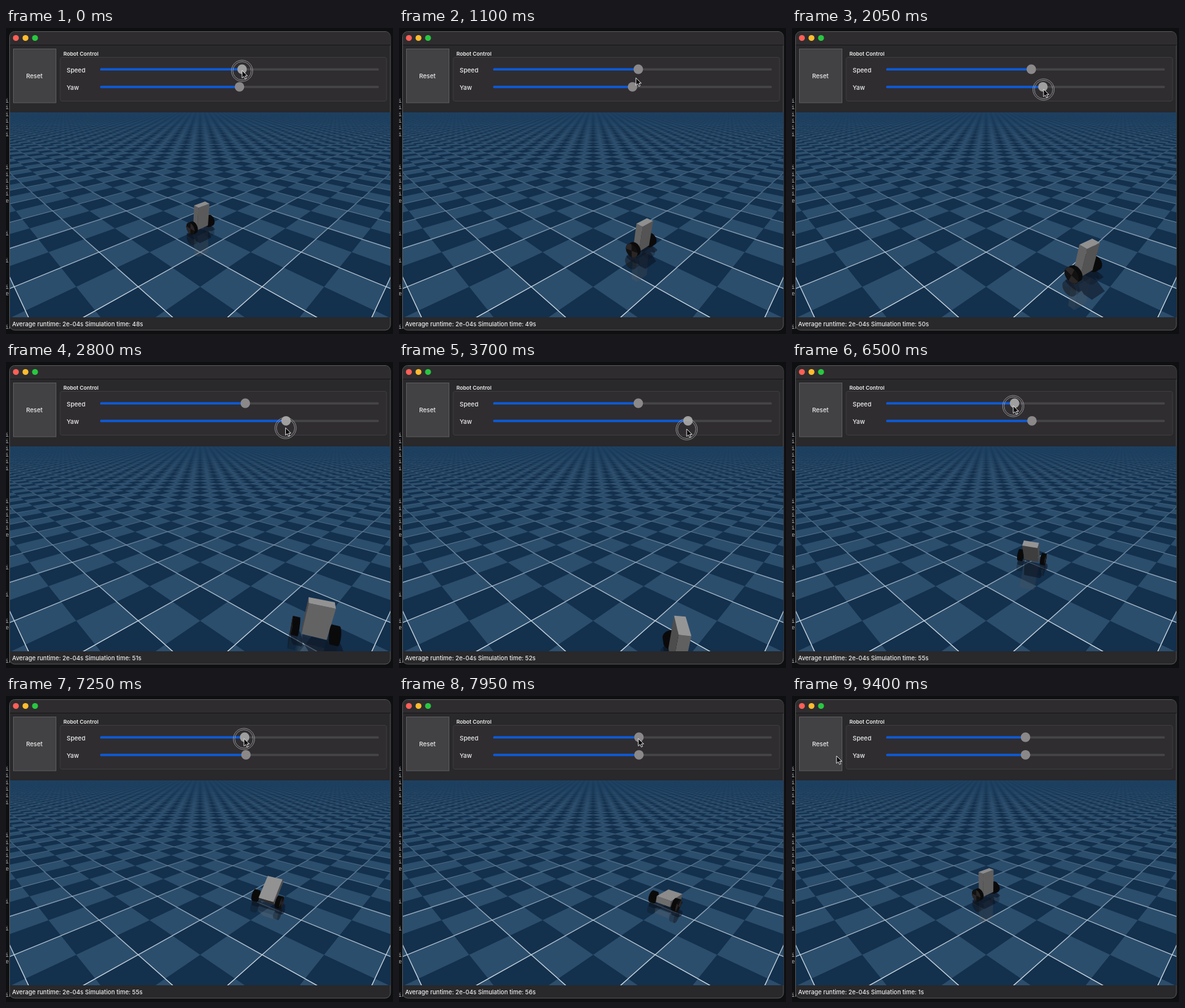
Recreate the animation shown at these times as an HTML page with a canvas. Size 600 px wide and 475 px high, loop 9450 ms.

```html
<!DOCTYPE html>
<html lang="en">
<head>
<meta charset="utf-8">
<title>Robot Control</title>
<style>
  html, body { margin: 0; width: 100%; height: 100%; overflow: hidden; background: #0e0f11; }
  svg { position: absolute; left: 0; top: 0; }
  canvas { position: absolute; left: 6px; top: 131px; }
  text { font: 500 9.5px Inter, "Open Sans", sans-serif; fill: #eeeeee; }
  .term text { font: 9px "DejaVu Sans Mono", monospace; fill: #b4b4b4; }
</style>
</head>
<body>
<svg width="600" height="475" viewBox="0 0 600 475">
  <g class="term" id="term"></g>
  <rect x="5.5" y="5.5" width="590.5" height="463.5" rx="8" fill="#29282a" stroke="#58585a"/>
  <path d="M6 26V14a8 8 0 0 1 8-8H588a8 8 0 0 1 8 8V26Z" fill="#2e2c2e"/>
  <path d="M6 26.5H596" stroke="#171718"/>
  <circle cx="15.3" cy="15.5" r="4.6" fill="#ff5f57"/>
  <circle cx="30.2" cy="15.5" r="4.6" fill="#febc2e"/>
  <circle cx="45" cy="15.5" r="4.6" fill="#28c840"/>
  <rect x="11.5" y="32.5" width="66" height="83.5" fill="#424143" stroke="#5c5b5d"/>
  <text x="44" y="78" text-anchor="middle">Reset</text>
  <text x="89" y="42.6" style="font-size:8.2px;font-weight:600">Robot Control</text>
  <rect x="84" y="45.5" width="506" height="68" rx="3" fill="#2f2d30" stroke="#3e3c3f"/>
  <text x="94" y="69">Speed</text>
  <text x="94" y="96">Yaw</text>
  <g id="sliders"></g>
  <text id="status" x="9.5" y="462.8" style="font-size:9.25px"></text>
  <g id="cursor">
    <g id="ring" fill="none" stroke="#b4b4b4" stroke-width=".7">
      <circle cy=".5" r="16.5"/><circle cy=".5" r="14.2"/>
    </g>
    <path d="M0 0V11.6L2.7 9.1 4.6 13.2 6.6 12.3 4.8 8.3H8.4Z" fill="#050505" stroke="#f4f4f4" stroke-width=".9"/>
  </g>
</svg>
<canvas id="view" width="590" height="318"></canvas>
<script>
const LOOP = 9450, RESET = 8650, STEP = 50;
const $ = id => document.getElementById(id);
const SVG = 'http://www.w3.org/2000/svg';
const add = (parent, tag, attrs) => {
  const el = document.createElementNS(SVG, tag);
  for (const k in attrs) el.setAttribute(k, attrs[k]);
  return parent.appendChild(el);
};

// Terminal edge peeking out behind the window
for (const [row, word] of [...[0, 1, 2, 3, 4, 5, 10, 11, 12, 13, 14, 20, 24, 28].map(r => [r, 'i']),
  [15, 'e'], [29, 'e'], [34, 'in']])
  add($('term'), 'text', { x: -1, y: 116 + row * 10.32 }).textContent = word;

const makeSlider = y => {
  add($('sliders'), 'rect', { x: 146, y: y - 1.5, width: 432, height: 3.4, rx: 1.5, fill: '#454446' });
  const bar = add($('sliders'), 'rect', { x: 146, y: y - 1.5, height: 3.4, rx: 1.5, fill: '#0a5adc' });
  const knob = add($('sliders'), 'circle', { cy: y, r: 7.4 });
  return (x, held) => {
    bar.setAttribute('width', x - 146);
    knob.setAttribute('cx', x);
    knob.setAttribute('fill', held ? '#a09f9f' : '#8a8889');
  };
};
const setSpeed = makeSlider(64), setYaw = makeSlider(91.3);

// Keyed motion: rows are [time, ...values]
const segment = (keys, t) => {
  let i = 0;
  while (i < keys.length - 2 && t >= keys[i + 1][0]) i++;
  const u = (t - keys[i][0]) / (keys[i + 1][0] - keys[i][0]);
  return [i, Math.min(1, Math.max(0, u))];
};
const ease = (keys, t) => {
  const [i, u] = segment(keys, t), s = u * u * (3 - 2 * u);
  return keys[i].slice(1).map((a, k) => a + (keys[i + 1][k + 1] - a) * s);
};
const spline = (keys, t) => {
  const [i, u] = segment(keys, t), last = keys.length - 1;
  const slope = (n, k) => {
    const a = keys[Math.max(0, n - 1)], b = keys[Math.min(last, n + 1)];
    return (b[k] - a[k]) / (b[0] - a[0]);
  };
  const p = keys[i], q = keys[i + 1], w = q[0] - p[0], v = 1 - u;
  return p.slice(1).map((a, n) => {
    const k = n + 1;
    return v * v * (1 + 2 * u) * a + u * u * (3 - 2 * u) * q[k]
      + w * u * v * (v * slope(i, k) - u * slope(i + 1, k));
  });
};

const SPEED = [[0, 366], [450, 371], [5900, 371], [6500, 345], [7400, 372], [RESET, 372]];
const YAW = [[1350, 362], [2050, 389], [3000, 440], [3700, 448], [4250, 436], [5000, 377], [5400, 372], [RESET, 372]];
const POINTER = [[0, 366, 66], [450, 370, 67], [900, 371, 67], [1350, 362, 92], [2050, 390, 95], [3000, 439, 103],
  [3700, 446, 104], [4250, 435, 100], [5000, 377, 94], [5400, 371, 94], [5900, 371, 67], [6500, 343, 68],
  [7400, 371, 66], [7950, 371, 66], [8550, 69, 93], [LOOP, 69, 93]];
const POSE = [[0, .01, -.045, 43], [2050, 1.168, -1.21, 34], [2875, 1.16, -1.71, -27], [3700, .76, -1.99, -98],
  [4350, .46, -1.72, -148], [5000, .37, -1.195, -183], [5750, .5, -.48, -195], [6500, .75, 0, -203],
  [7300, 1.05, -.28, -216], [7950, 1.087, -.327, -222], [RESET, 1.087, -.327, -222]];
const PITCH = [[0, 4], [2050, 2], [3700, 0], [5000, 3], [5900, 4], [6500, -31], [7000, -16], [7450, 95], [RESET, 95]];

// Camera: x to the right, d away along the floor, h up
const FOCAL = 384, EYE = 1.939, ORIGIN = 3.628, TILT = 25 * Math.PI / 180;
const ST = Math.sin(TILT), CT = Math.cos(TILT);
const project = ([x, d, h]) => {
  const drop = EYE - h, z = d * CT + drop * ST;
  return [301 + FOCAL * x / z, 290 + FOCAL * (drop * CT - d * ST) / z, z];
};
const trace = (c, pts) => {
  pts.forEach((p, i) => i ? c.lineTo(p[0], p[1]) : c.moveTo(p[0], p[1]));
  c.closePath();
};
const fill = (c, pts, color) => {
  c.beginPath();
  trace(c, pts);
  c.fillStyle = color;
  c.fill();
};

const gridPoint = (u, v) => project([(u - v) * Math.SQRT1_2, ORIGIN + (u + v) * Math.SQRT1_2, 0]);
const drawFloor = () => {
  const canvas = document.createElement('canvas');
  canvas.width = 590;
  canvas.height = 318;
  const c = canvas.getContext('2d');
  c.translate(-6, -131);
  c.fillStyle = '#13304d';
  c.fillRect(6, 131, 590, 318);
  for (let i = -10; i < 150; i++) for (let j = -10; j < 150; j++) {
    if (!((i + j) & 1)) continue;
    const pts = [[0, 0], [1, 0], [1, 1], [0, 1]].map(([a, b]) => gridPoint((i + a) / 2, (j + b) / 2));
    if (pts.some(p => p[2] < .3) || pts.every(p => p[0] < 6) || pts.every(p => p[0] > 596)) continue;
    fill(c, pts, '#2c4e6d');
  }
  const fade = c.createLinearGradient(0, 140, 0, 449);
  fade.addColorStop(0, 'rgba(190,210,225,0)');
  fade.addColorStop(.35, 'rgba(190,210,225,.25)');
  fade.addColorStop(.7, 'rgba(215,228,236,.75)');
  fade.addColorStop(1, 'rgba(230,238,242,.95)');
  c.strokeStyle = fade;
  for (let n = -6; n < 50; n++) for (const flip of [0, 1]) {
    const at = s => flip ? gridPoint(s, n + .5) : gridPoint(n + .5, s);
    let start = -9;
    while (at(start)[2] < .4) start += .25;
    const a = at(start), b = at(75);
    c.lineWidth = n < 2 ? 1.3 : .9;
    c.beginPath();
    c.moveTo(a[0], a[1]);
    c.lineTo(b[0], b[1]);
    c.stroke();
  }
  const haze = c.createLinearGradient(0, 131, 0, 168);
  haze.addColorStop(0, 'rgba(30,65,98,.8)');
  haze.addColorStop(1, 'rgba(30,65,98,0)');
  c.fillStyle = haze;
  c.fillRect(6, 131, 590, 40);
  return canvas;
};

const hull = pts => {
  const sorted = [...pts].sort((a, b) => a[0] - b[0] || a[1] - b[1]);
  const half = list => {
    const out = [];
    for (const p of list) {
      while (out.length > 1) {
        const [a, b] = out.slice(-2);
        if ((b[0] - a[0]) * (p[1] - a[1]) - (b[1] - a[1]) * (p[0] - a[0]) > 0) break;
        out.pop();
      }
      out.push(p);
    }
    return out.slice(0, -1);
  };
  return [...half(sorted), ...half(sorted.reverse())];
};

const RADIUS = .098, SIDES = 28, INNER = .153, OUTER = .222;
const HALF = [.118, .05, .199], MID = [0, 0, .158];
const circle = (a, spin = 0) => Array.from({ length: SIDES }, (_, i) => {
  const q = spin + i / SIDES * 2 * Math.PI;
  return [a, RADIUS * Math.cos(q), RADIUS * Math.sin(q)];
});
const corner = signs => signs.map((s, k) => MID[k] + s * HALF[k]);
const QUAD = [[-1, -1], [1, -1], [1, 1], [-1, 1]];
const CORNERS = [-1, 1].flatMap(s => QUAD.map(([a, b]) => corner([a, b, s])));
const FACES = [0, 1, 2].flatMap(k => [-1, 1].map(s => {
  const place = (a, b) => { const v = [a, b]; v.splice(k, 0, s); return corner(v); };
  const normal = [0, 0, 0];
  normal[k] = s;
  return { normal, pts: QUAD.map(q => place(...q)), mid: place(0, 0) };
}));
const dot = (a, b) => a[0] * b[0] + a[1] * b[1] + a[2] * b[2];
const sub = (a, b) => a.map((v, k) => v - b[k]);
const unit = a => { const n = Math.hypot(...a); return a.map(v => v / n); };

const placer = ([x, d, yaw], pitch, mirror) => {
  const q = yaw * Math.PI / 180, p = pitch * Math.PI / 180;
  return ([a, f, h]) => {
    const fwd = f * Math.cos(p) + h * Math.sin(p), up = h * Math.cos(p) - f * Math.sin(p);
    return [x + a * Math.cos(q) + fwd * Math.sin(q),
      ORIGIN + d + a * Math.sin(q) - fwd * Math.cos(q), mirror * (RADIUS + up)];
  };
};
const drawRobot = (c, pose, pitch, spin, mirror) => {
  const place = placer(pose, pitch, mirror), screen = p => project(place(p));
  const toEye = p => unit(sub([0, 0, EYE], p));
  const box = () => {
    for (const { normal, pts, mid } of FACES) {
      const n = sub(place(normal), place([0, 0, 0])), facing = dot(n, toEye(place(mid)));
      if (facing <= 0) continue;
      const g = Math.round(70 + 55 * n[2] * mirror + 40 * facing);
      fill(c, pts.map(screen), `rgb(${g},${g - 1},${g - 1})`);
    }
  };
  const wheel = side => () => {
    const inner = circle(side * INNER), outer = circle(side * OUTER, spin);
    fill(c, hull([...inner, ...outer].map(screen)), '#0a0a0b');
    const cap = [side * OUTER, 0, 0];
    if (dot(sub(place(cap), place([0, 0, 0])), toEye(place(cap))) <= 0) return;
    fill(c, outer.map(screen), '#111112');
    for (const start of [0, SIDES / 2])
      fill(c, [cap, ...outer.slice(start, start + SIDES / 4 + 1)].map(screen), '#2a2625');
  };
  [[[0, 0, .05], box], [[-INNER, 0, 0], wheel(-1)], [[INNER, 0, 0], wheel(1)]]
    .map(([p, draw]) => [screen(p)[2], draw])
    .sort((a, b) => b[0] - a[0])
    .forEach(([, draw]) => draw());
};
const drawShadow = (c, pose, pitch) => {
  const place = placer(pose, pitch, 1);
  const cast = p => {
    const [x, d, h] = place(p);
    return project([x + h * .05, d - h * .64, 0]);
  };
  c.beginPath();
  for (const part of [CORNERS, ...[-1, 1].map(s => [...circle(s * INNER), ...circle(s * OUTER)])])
    trace(c, hull(part.map(cast)));
  c.fillStyle = 'rgba(10,18,32,.55)';
  c.fill();
};

const ctx = $('view').getContext('2d'), floor = drawFloor();
const held = t => t < 900 ? 'speed' : t >= 1350 && t < 5400 ? 'yaw' : t >= 5900 && t < 7400 ? 'speed' : '';

const render = t => {
  const fresh = t >= RESET;
  const pose = fresh ? [0, 0, 45] : spline(POSE, t);
  const pitch = fresh ? 0 : ease(PITCH, t)[0];
  const spin = fresh ? 0 : -t * .007;
  ctx.setTransform(1, 0, 0, 1, 0, 0);
  ctx.drawImage(floor, 0, 0);
  ctx.translate(-6, -131);
  ctx.globalAlpha = .25;
  drawRobot(ctx, pose, pitch, spin, -1);
  ctx.globalAlpha = 1;
  drawShadow(ctx, pose, pitch);
  drawRobot(ctx, pose, pitch, spin, 1);

  const grip = held(t), [x, y] = ease(POINTER, t);
  setSpeed(fresh ? 362 : ease(SPEED, t)[0], grip === 'speed');
  setYaw(fresh ? 362 : ease(YAW, t)[0], grip === 'yaw');
  $('cursor').setAttribute('transform', `translate(${x} ${y})`);
  $('ring').setAttribute('visibility', grip ? 'visible' : 'hidden');
  const seconds = Math.round(fresh ? (t - RESET) / 1000 : 48.2 + t / 1000);
  $('status').textContent = `Average runtime: 2e-04s Simulation time: ${seconds}s`;
};

const begin = performance.now();
const tick = () => {
  const t = (performance.now() - begin) % LOOP;
  render(Math.floor(t / STEP) * STEP);
  requestAnimationFrame(tick);
};
tick();
</script>
</body>
</html>
```
